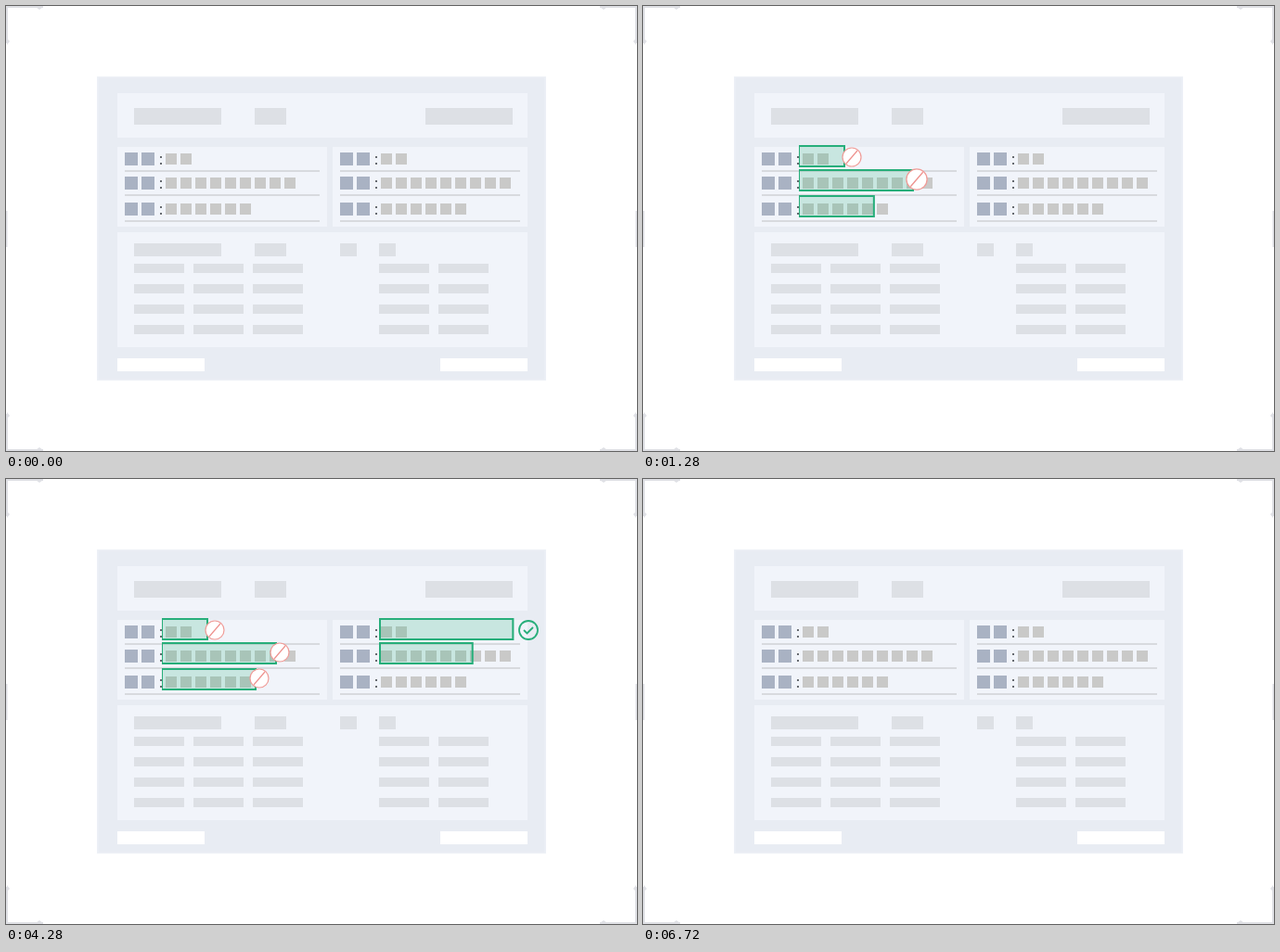
An HTML page with a canvas for the animation above (7.92 s loop, 680 px wide and 480 px high).

```html
<!DOCTYPE html>
<html lang="en">
<head>
<meta charset="utf-8">
<title>Form fields</title>
<style>
html, body { margin: 0; width: 100%; height: 100%; overflow: hidden; background: #fff; }
canvas { display: block; }
</style>
</head>
<body>
<canvas id="stage" width="680" height="480"></canvas>
<script>
const ctx = document.getElementById('stage').getContext('2d');
const LOOP = 7920, STEP = 40, GROW = 400, STAGGER = 200;
const GREEN = '#27ae7a', BAR = '#dde0e5', CARD = '#f1f4fa', MARK = '#dfe0e5';
const rowTops = [150, 176, 204];
const counts = [2, 9, 6];

const groups = [
  { x: 168, widths: [50, 124, 102], start: 680, edge: 1, icons: [225, 295, 273], ok: false },
  { x: 402, widths: [146, 146, 146], start: 3916, edge: 2, icons: [563, 563, 563], ok: true }
];

const clamp = v => Math.max(0, Math.min(1, v));

// cubic-bezier(.25, .1, .25, 1)
function ease(p) {
  p = clamp(p);
  const curve = (a, b, u) => 3 * a * u * (1 - u) ** 2 + 3 * b * u * u * (1 - u) + u ** 3;
  let lo = 0, hi = 1;
  for (let i = 0; i < 24; i++) {
    const mid = (lo + hi) / 2;
    if (curve(.25, .25, mid) < p) lo = mid; else hi = mid;
  }
  return p === 1 ? 1 : curve(.1, 1, lo);
}

function spring(ms) {
  const s = ms / 1000;
  return ms > 500 ? 1 : 1 - Math.exp(-11 * s) * Math.cos(2 * Math.PI * s / .3);
}

function rect(color, x, y, w, h) {
  ctx.fillStyle = color;
  ctx.fillRect(x, y, w, h);
}

function line(color, width, points) {
  ctx.strokeStyle = color;
  ctx.lineWidth = width;
  ctx.beginPath();
  points.forEach(([x, y]) => ctx.lineTo(x, y));
  ctx.stroke();
}

function circle(color, width, r) {
  ctx.strokeStyle = color;
  ctx.lineWidth = width;
  ctx.beginPath();
  ctx.arc(0, 0, r, 0, Math.PI * 2);
  ctx.stroke();
}

function poly(color, points) {
  ctx.fillStyle = color;
  ctx.beginPath();
  points.forEach(([x, y]) => ctx.lineTo(x, y));
  ctx.fill();
}

function drawCorners() {
  for (const sx of [1, -1]) for (const sy of [1, -1]) {
    ctx.save();
    ctx.translate(sx < 0 ? 680 : 0, sy < 0 ? 480 : 0);
    ctx.scale(sx, sy);
    rect(MARK, 0, 0, 40, 2);
    rect(MARK, 0, 0, 2, 40);
    poly(MARK, [[32, 1], [36, 4], [40, 1]]);
    poly(MARK, [[1, 35], [4, 38], [1, 42]]);
    ctx.restore();
  }
  rect(MARK, 0, 221, 1.5, 39);
  rect(MARK, 678.5, 221, 1.5, 39);
}

function drawFields(x, lineWidth) {
  rowTops.forEach((y, r) => {
    rect('#a9b2c3', x, y + 8, 14, 14);
    rect('#a9b2c3', x + 18, y + 8, 14, 14);
    rect('#666a70', x + 38, y + 12, 2, 2);
    rect('#666a70', x + 38, y + 19, 2, 2);
    for (let i = 0; i < counts[r]; i++) rect('#c9c9c8', x + 44 + 16 * i, y + 9, 12, 12);
    rect('#d8dade', x, y + 27, lineWidth, 2);
  });
}

function drawForm() {
  rect('#edf0f6', 98, 76, 484, 328);
  rect('#e8ecf3', 99.5, 77.5, 481, 325);
  rect(CARD, 120, 94, 442, 48);
  rect(CARD, 120, 152, 226, 86);
  rect(CARD, 352, 152, 210, 86);
  rect(CARD, 120, 244, 442, 124);
  rect('#fff', 120, 380, 94, 14);
  rect('#fff', 468, 380, 94, 14);
  for (const [x, w] of [[138, 94], [268, 34], [452, 94]]) rect(BAR, x, 110, w, 18);
  for (const [x, w] of [[138, 94], [268, 34], [360, 18], [402, 18]]) rect(BAR, x, 256, w, 14);
  for (let r = 0; r < 4; r++)
    for (const x of [138, 202, 266, 402, 466]) rect(BAR, x, 278 + 22 * r, 54, 10);
  drawFields(128, 210);
  drawFields(360, 194);
}

function drawBox(x, y, w, edge) {
  rect('rgba(39,174,122,.2)', x, y, w, 24);
  rect(GREEN, x, y, w, 2);
  rect(GREEN, x, y + 22, w, 2);
  rect(GREEN, x, y + 2, edge, 20);
  rect(GREEN, x + w - 2, y + 2, 2, 20);
}

function drawIcon(x, y, scale, ok) {
  ctx.save();
  ctx.translate(x, y);
  ctx.scale(scale, scale);
  if (ok) {
    circle(GREEN, 1.8, 10);
    line(GREEN, 1.8, [[-5, 0], [-1.5, 3.4], [5, -3]]);
  } else {
    ctx.fillStyle = '#fff';
    ctx.beginPath();
    ctx.arc(0, 0, 10, 0, Math.PI * 2);
    ctx.fill();
    circle('#f09c98', 1.2, 10);
    line('#ee928e', 1.2, [[-6, 7], [6, -7]]);
  }
  ctx.restore();
}

function drawGroup(g, t) {
  rowTops.forEach((y, r) => {
    const age = t - g.start - r * STAGGER;
    if (age <= 0) return;
    drawBox(g.x, y, Math.max(4, g.widths[r] * ease(age / GROW)), g.edge);
  });
  rowTops.forEach((y, r) => {
    const age = t - g.start - r * STAGGER - (g.ok ? 200 : 220);
    if (age <= 0) return;
    const scale = g.ok ? ease(age / 160) : spring(age);
    drawIcon(g.icons[r], y + (r === 0 ? 13 : 11), scale, g.ok);
  });
}

// The marks fade as one flattened layer, over a redrawn form.
function draw(t) {
  ctx.globalAlpha = 1;
  rect('#fff', 0, 0, 680, 480);
  drawCorners();
  drawForm();
  if (t >= 6720) return;
  groups.forEach(g => drawGroup(g, t));
  const gone = ease((t - 6440) / 400);
  if (gone > 0) {
    ctx.save();
    ctx.beginPath();
    ctx.rect(98, 76, 484, 328);
    ctx.clip();
    ctx.globalAlpha = gone;
    ctx.drawImage(blank, 0, 0);
    ctx.restore();
  }
}

const blank = document.createElement('canvas');
blank.width = 680;
blank.height = 480;
rect('#fff', 0, 0, 680, 480);
drawCorners();
drawForm();
blank.getContext('2d').drawImage(ctx.canvas, 0, 0);

const begin = performance.now();
function tick() {
  const t = (performance.now() - begin) % LOOP;
  draw(Math.floor(t / STEP) * STEP);
  requestAnimationFrame(tick);
}
tick();
</script>
</body>
</html>
```
